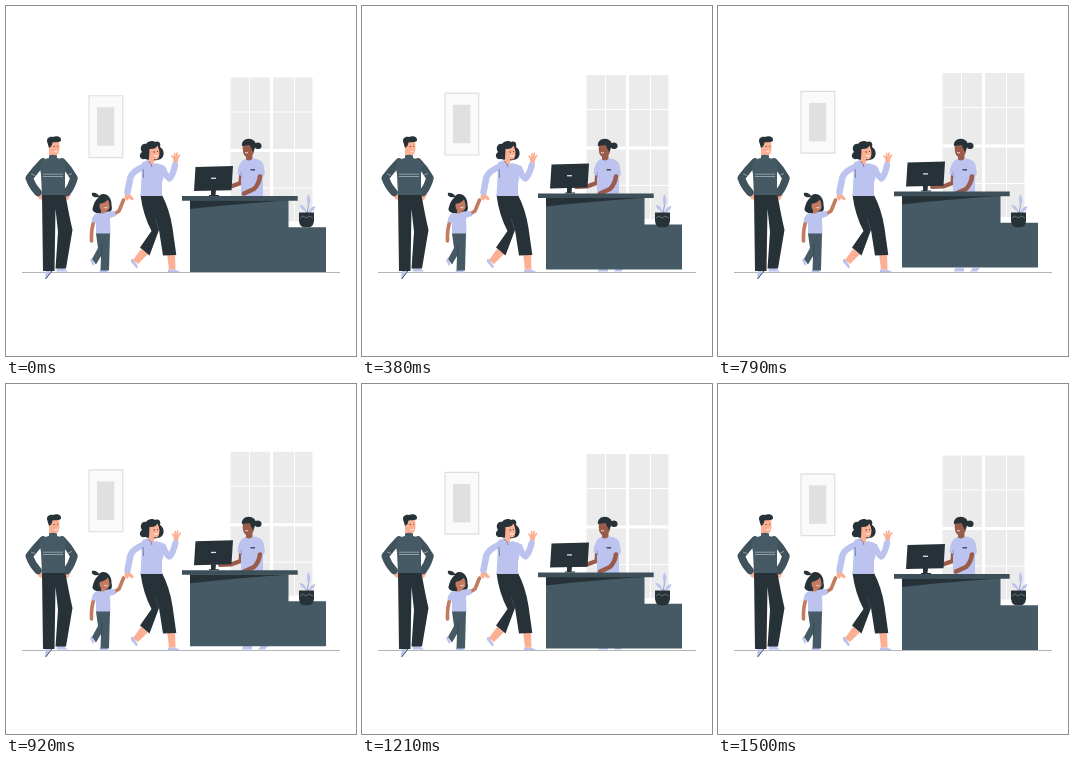
Write an HTML page that moves like this. It is 350 by 350 pixels and loops after 1.54 s.

```html
<!DOCTYPE html>
<html lang="en">
<head>
<meta charset="utf-8">
<style>
html, body { margin: 0; width: 100%; height: 100%; overflow: hidden; background: #fff; }
svg { display: block; width: 100vw; height: 100vh; }
path { stroke-linejoin: round; }
.lilac { fill: #bbc3ee; }
.dark { fill: #263238; }
.slate { fill: #455a64; }
.fair { fill: #fcb093; }
.tan { fill: #c27a60; }
.brown { fill: #9a5b4a; }
.limb { fill: none; stroke-linecap: round; }
</style>
</head>
<body>
<svg viewBox="0 0 350 350">
  <path d="M16 266.500H334" stroke="#91979c" stroke-width=".7"/>

  <g class="lift">
    <path fill="#ebebeb" d="M224.500 71.500H306.500V215.500H224.500Z"/>
    <path stroke="#fff" d="M243.500 71V216M288.500 71V216M224 106H307M224 182H307"/>
    <path stroke="#fff" stroke-width="3" d="M265.500 71V216M224 144.500H307"/>
    <path fill="#fafafa" stroke="#dedede" stroke-width="1.2" d="M83.100 89.800H116.800V151.600H83.100Z"/>
    <path fill="#e0e0e0" d="M91 101.300H108.300V139.800H91Z"/>
  </g>

  <g id="man">
    <path class="fair" d="M43 136L53 135Q54.500 144 52 148Q50.500 150 48 149.500V153H43Z"/>
    <path class="dark" d="M41.500 137C39.500 132 44 130 47 131C50 129.500 55.500 130 55 134.500C54 136.500 50 136 46.500 136.500L45.500 140L43 142Z"/>
    <path d="M47.500 140.500h1.300M51 140.200h1" stroke="#263238" stroke-width=".8"/>
    <path d="M48.500 145.500q2 1 3-.5" fill="none" stroke="#fff" stroke-width=".9"/>
    <path class="fair" d="M31 187L37 187L36.500 194L33 193ZM60 187L65 188L62 194L58 193Z"/>
    <path class="limb" stroke="#40535d" stroke-width="7.500" d="M37 156Q30 163 23.200 172Q26 180 32 186.500M56 156Q63 163 68 172Q66 180 61 186.500"/>
    <path class="slate" d="M43 149.500Q47 148 51 149.500V152L57 153.500Q61 157 59 167L59 190H36L35 168Q32 158 37 153.500L43 152Z"/>
    <path d="M25 168l4 1.500M37 168.200H57M37 170.500H57M62 169l4-1.500" stroke="#aab5bb" stroke-width=".75"/>
    <path class="lilac" d="M40 264L46.500 264.500L40.500 273L39 272ZM51 261.500H57L62 265.500H50.500Z"/>
    <path d="M39.500 273L46 265" stroke="#455a64"/>
    <path class="dark" d="M36 189H59.500Q63 209 66.500 224L60 262.500H49.500L52 226L49.500 203L48.500 265H37Z"/>
  </g>

  <g id="child">
    <path class="dark" d="M93 191C88 192 85 190 86 187C89 186 92 188 93 190C98 185 106 190 105.500 199C107 205 104 207 101 206C94 209 84 207 87 201C88 198 89 194 93 191Z"/>
    <path class="tan" d="M93.500 198Q99 197 102 193.500Q105.500 202 101.500 204.500L100 205V208H95V204Q93 202 93.500 198Z"/>
    <path d="M98.500 201.500q2 1 3-.5" fill="none" stroke="#fff" stroke-width=".8"/>
    <path class="limb" stroke="#c27a60" stroke-width="3.600" d="M88.500 214Q85 222 85.500 235M108 208L113 205L117.500 194"/>
    <path class="lilac" d="M91 207Q96 209 101 205.500L109 205L110 210L104 212L104.500 228H90V217L85.500 216Q86 209 91 207Z"/>
    <path class="lilac" d="M85.500 252L88.500 258L87 260L84 254ZM94 264L101 263.500L102 266.500H93.500Z"/>
    <path class="slate" d="M90 227.500H104L103 264.500H94.500L95 250L90 258.500L86 253L92 242Z"/>
    <path d="M96 238L95.500 251" stroke="#37474f" stroke-width=".8"/>
  </g>

  <g id="mother">
    <path class="lilac" d="M125 253L127 253L132 260.500L130.500 262.500L125 256ZM162 263.500H169L174.500 266H162Z"/>
    <path class="fair" d="M135 243L142 248L132 258L127 254ZM161 247H169L169.500 263.500H163Z"/>
    <path class="dark" d="M134.500 189H156Q163.500 203 166.500 222L170.300 249L157 249.500L153 224L143.500 249.500L134 241.500L145.500 225Q137 209 134.500 189Z"/>
    <path d="M153 224L149 212" stroke="#455a64" stroke-width=".6"/>
    <path class="dark" d="M140 138C143 133.500 148 135 149 136C154 134 155 139 154 141C159 144 158 150 156 152C151 156 143 154 139 153C134 154 132 149 136 146C133 142 136 137 140 138Z"/>
    <path class="fair" d="M143.500 143Q149.500 143.500 151.500 139.500Q155 147 152.500 152Q150.500 154.500 148 153V158L152 160L145 162L141 158L143 153Z"/>
    <path d="M147.500 146h1.500M151 145.500h1" stroke="#263238" stroke-width=".8"/>
    <path d="M148 149.500q2 1.500 4 0" fill="none" stroke="#fff" stroke-width=".9"/>
    <path class="fair" d="M119 187L124 188L128 193L126 194.500L123 192.500L121 195L118.500 192Z"/>
    <path class="limb" stroke="#bbc3ee" stroke-width="6.500" d="M137 161Q127 165 124.500 171L121.500 186"/>
    <path class="lilac" d="M136 156.500L142 154Q145 161 150 157L157 159Q159 169 156 177V190H134.500L135.500 171Z"/>
    <path d="M137 163L137.500 172M142 155Q146 158 146 161" fill="none" stroke="#68709f" stroke-width=".8"/>
    <g id="wave">
      <path class="limb" stroke="#fcb093" stroke-width="1.700" d="M169 154L166 150M169 153L168.500 147.500M170 153L171 147M171 153L173.500 149"/>
      <path class="fair" d="M167 151L172.500 151L171.500 158H167.500Z"/>
      <path class="limb" stroke="#bbc3ee" stroke-width="6.300" d="M157 163Q160 171 163.500 172.500Q167 169 169 159"/>
    </g>
  </g>

  <g id="clerk">
    <path class="lilac" d="M237 262H246V265.500H236ZM255 262H262L259 265.500H252Z"/>
    <path class="limb" stroke="#9a5b4a" stroke-width="4" d="M235 168L234.500 177L225 180.500L214 181"/>
    <path class="brown" d="M236.800 138L248 136Q249.500 145 246.500 149V156H240V151Q236 149 236.800 138Z"/>
    <path class="dark" d="M236 140C235 134 242 131 247 134Q249 135 249.500 137C254 135 257 139 255 142C253 144 250 143 249 141.500L247 146L243.500 139Z"/>
    <path d="M239 146.500q2 1 3 0" fill="none" stroke="#fff" stroke-width=".8"/>
    <path class="lilac" d="M239 153Q243 156 247 152.500Q256 153 257.500 159L259 168L257 171V192H235V170L231.500 168Q232 156 239 153Z"/>
    <path d="M235 166L235.500 171M251 171L256 169" stroke="#7e86bc" stroke-width=".7"/>
    <path d="M244.500 163.800H249" stroke="#37474f" stroke-width="1.400"/>
    <path class="limb" stroke="#9a5b4a" stroke-width="4.500" d="M254 170.500Q253 178 248 183L238 187.500"/>
  </g>

  <g class="lift">
    <path class="slate" d="M184 194H282.500V221.200H320V266H184Z"/>
    <path class="dark" d="M184 194.500H282.500Q237 197 184 203Z"/>
    <path fill="#3d4f58" d="M176 190H291.700V194.700H176Z"/>
    <path class="dark" d="M205 184H210L209.500 189H213V190H203V189H205Z"/>
    <path class="dark" d="M189.500 161L227 160L225.500 184.200L188 185Z"/>
    <path d="M205 172.300H210" stroke="#dce1e4" stroke-width="1.300"/>
  </g>

  <g id="plant">
    <path class="limb" stroke="#7e86bc" stroke-width=".8" d="M301 208Q303 200 302.500 192M301 207Q298 202 295 200M302 207Q305 203 308 201"/>
    <path class="lilac" d="M302.500 188Q306 194 303 200Q299 194 302.500 188ZM293.500 199Q299 199 300 205Q295 204 293.500 199ZM309.500 200Q308 206 303 206Q304 201 309.500 200Z"/>
    <path class="dark" d="M293 206.500H308V215Q307 221.200 303 221.200H298Q294 221.200 293 215Z"/>
    <path d="M294 212l3-2 3 2 3-2 4 2" fill="none" stroke="#78868d" stroke-width=".7"/>
  </g>
</svg>
<script>
const LOOP = 1540, LEAD = 40, RISE = 4.5;
const lifted = document.querySelectorAll('.lift');
const hand = document.getElementById('wave');

// Eases from 0 to 1 and back once per period.
const swing = (t, period) => (1 - Math.cos(2 * Math.PI * t / period)) / 2;

function draw() {
  const t = performance.now() % LOOP + LEAD;
  const y = -RISE * swing(t, LOOP);
  lifted.forEach(g => g.setAttribute('transform', `translate(0 ${y})`));
  hand.setAttribute('transform', `rotate(${3 * swing(t, LOOP / 2)} 163 173)`);
  requestAnimationFrame(draw);
}
draw();
</script>
</body>
</html>
```
